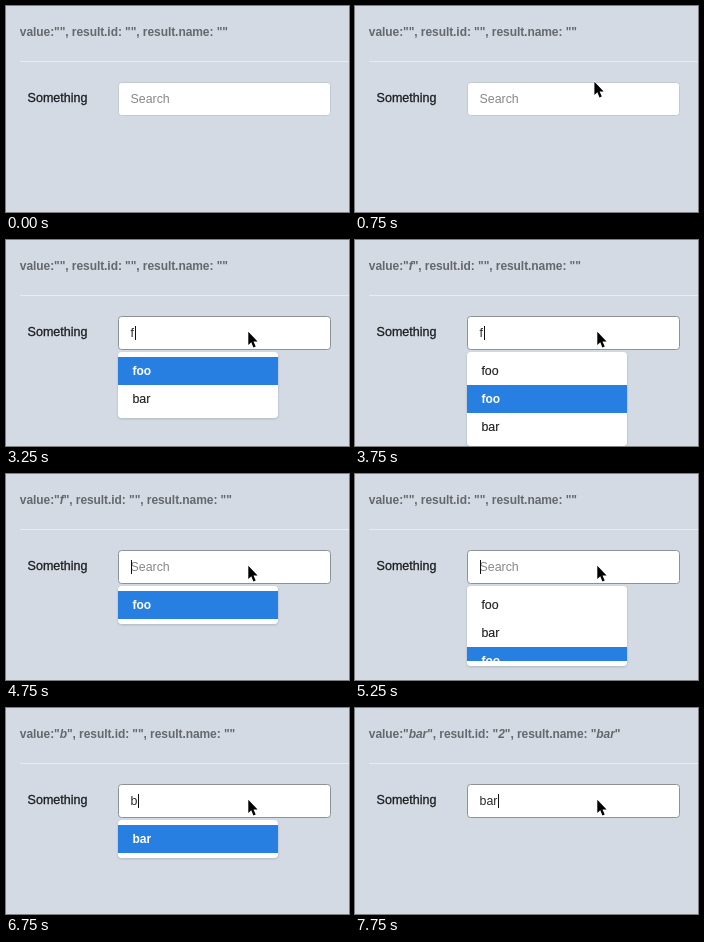
An HTML page for the animation above (8 s loop, 343 px wide and 206 px high).

```html
<!DOCTYPE html>
<html lang="en">
<head>
<meta charset="utf-8">
<title>Search dropdown</title>
<style>
  html, body { margin: 0; width: 100%; height: 100%; overflow: hidden; background: #d3dae3; }
  svg { display: block; width: 343px; height: 206px; }
  text { font: 12.4px "Liberation Sans", Arial, sans-serif; white-space: pre; }
  .head { font-weight: bold; font-size: 12px; letter-spacing: -.07px; fill: #65686c; }
  .em { font-style: italic; }
  .label { fill: #1c1e20; stroke: #1c1e20; stroke-width: .3px; }
  .row { fill: #222; stroke: #222; stroke-width: .15px; }
  .row.on { font-weight: bold; font-size: 12px; fill: #fff; stroke: none; }
</style>
</head>
<body>
<svg viewBox="0 0 343 206">
  <defs>
    <filter id="shadow" x="-10%" y="-10%" width="120%" height="125%">
      <feDropShadow dx="0" dy="1" stdDeviation="1" flood-color="#223" flood-opacity=".2"/>
    </filter>
    <clipPath id="clip"><rect id="clipBox" x="112" y="112" width="160"/></clipPath>
  </defs>
  <rect width="343" height="206" fill="#d3dae3"/>
  <text class="head" id="head" x="13.8" y="30"></text>
  <rect x="14" y="55" width="329" height="1" fill="#e8ebef"/>
  <text class="label" x="21.6" y="96" style="font-size:12.5px">Something</text>
  <rect id="field" x="112.5" y="76.5" width="212" height="33" rx="3" fill="#fff"/>
  <text id="entry" x="124.5" y="97"></text>
  <rect id="caret" y="86" width="1" height="14" fill="#111"/>
  <g id="menu">
    <rect id="panel" x="112" y="112" width="160" rx="4" fill="#fff" filter="url(#shadow)"/>
    <g id="rows" clip-path="url(#clip)"></g>
  </g>
  <path id="mouse" d="M0 0V13.2L3 10.4L5.1 15.6L7.4 14.6L5.2 9.6H9.3Z" fill="#000" stroke="#fff" stroke-width="1.1" paint-order="stroke"/>
</svg>
<script>
const LOOP = 8000, ROW = 28, PAD = 5, TOP = 112;
const $ = id => document.getElementById(id);

// Each track lists [start ms, value]; a value holds until the next start.
const tracks = {
  mouse: [[0, null], [750, [239.4, 75.8]], [1000, [222.7, 91.8]], [1750, [242.3, 91.8]]],
  border: [[0, "#c3c9d1"], [1000, "#a9aeb5"], [1250, "#8e9297"]],
  entry: [[0, ""], [3250, "f"], [4750, ""], [6000, "b"], [7500, "bar"]],
  caret: [[0, 0], [1000, 1], [1500, 0], [2000, 1], [2500, 0], [3000, 1],
          [4500, 0], [4750, 1], [7250, 0], [7500, 1]],
  value: [[0, ""], [3750, "f"], [5250, ""], [6500, "b"], [7750, "bar"]],
  id: [[0, ""], [7500, "2"]],
  name: [[0, ""], [7500, "bar"]],
  // "*" marks the highlighted row; leaving rows stay briefly below the new ones
  rows: [[0, ""], [1000, "*foo bar"], [3750, "foo *foo bar"], [4000, "*foo"],
         [5250, "foo bar *foo"], [5500, "*foo bar"], [6500, "bar *foo bar"],
         [6750, "*bar"], [7750, ""]],
  shrink: [[0, 0], [5250, 14], [5500, 0]]
};
const caretX = { "": 125, f: 129, b: 132, bar: 143 };

const at = (track, t) => track.reduce((v, [start, next]) => t >= start ? next : v, null);

function set(el, attrs) {
  for (const k in attrs) el.setAttribute(k, attrs[k]);
}

function add(parent, tag, attrs, text) {
  const el = document.createElementNS("http://www.w3.org/2000/svg", tag);
  set(el, attrs);
  if (text) el.textContent = text;
  parent.appendChild(el);
}

function drawHead(s) {
  const head = $("head");
  head.textContent = "";
  const part = (label, val) => {
    add(head, "tspan", {}, label + '"');
    if (val) add(head, "tspan", { class: "em" }, val);
    add(head, "tspan", {}, '"');
  };
  part("value:", s.value);
  part(", result.id: ", s.id);
  part(", result.name: ", s.name);
}

function drawMenu(s) {
  const list = s.rows ? s.rows.split(" ") : [];
  const height = list.length * ROW + 2 * PAD - s.shrink;
  $("menu").style.display = list.length ? "" : "none";
  set($("panel"), { height });
  set($("clipBox"), { height: height - PAD });
  $("rows").textContent = "";
  list.forEach((item, i) => {
    const on = item[0] === "*";
    const y = TOP + PAD + i * ROW;
    if (on) add($("rows"), "rect", { x: 112, y, width: 160, height: ROW, fill: "#2780e1" });
    add($("rows"), "text", { x: 126.4, y: y + 18, class: on ? "row on" : "row" }, item.replace("*", ""));
  });
}

let last = "";
function draw(t) {
  const s = {};
  for (const k in tracks) s[k] = at(tracks[k], t);
  const key = JSON.stringify(s);
  if (key === last) return;
  last = key;

  drawHead(s);
  drawMenu(s);
  set($("field"), { stroke: s.border });
  $("entry").textContent = s.entry || "Search";
  set($("entry"), { fill: s.entry ? "#2b2b2b" : "#85878a" });
  set($("caret"), { x: caretX[s.entry], opacity: s.caret });
  $("mouse").style.display = s.mouse ? "" : "none";
  if (s.mouse) set($("mouse"), { transform: `translate(${s.mouse})` });
}

const begin = performance.now();
function tick() {
  draw((performance.now() - begin) % LOOP);
  requestAnimationFrame(tick);
}
tick();
</script>
</body>
</html>
```
